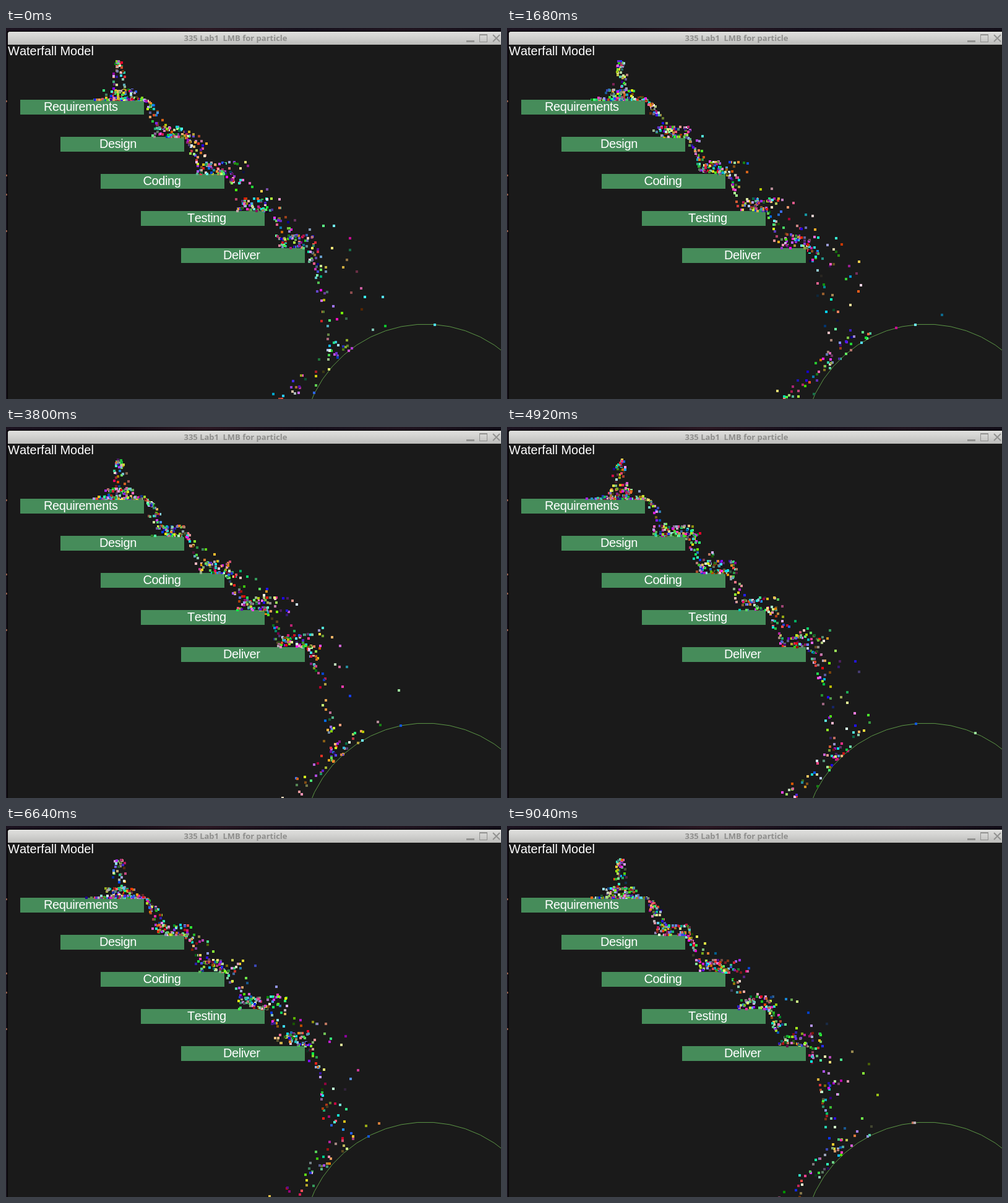
These frames come from a looping animation (800x600 px, 9.07 s). An HTML page with a canvas:

```html
<!DOCTYPE html>
<html lang="en">
<head>
<meta charset="utf-8">
<title>Waterfall Model</title>
<style>
  html, body { margin: 0; width: 100%; height: 100%; overflow: hidden; background: #1a1a1a; }
  canvas { display: block; }
</style>
</head>
<body>
<canvas id="stage" width="800" height="600"></canvas>
<script>
const ctx = document.getElementById('stage').getContext('2d');

const LOOP = 9070, FRAME = 40, STEPS_PER_FRAME = 2.5, WARM_UP = 1000;
const GRAVITY = 0.1, SLIDE = 0.014, DRAG = 0.995, BOUNCE = 0.52;
const EXTRA_RATE = 0.35;
const BOX_W = 200, BOX_H = 24;
const BALL = { x: 678, y: 679, r: 200, sides: 48, bounce: 0.3 };

const boxes = [
  ['Requirements', 61], ['Design', 151], ['Coding', 221.5],
  ['Testing', 293], ['Deliver', 351]
].map(([label, textX], i) => ({ label, textX, x: 23 + 65 * i, y: 116 + 60 * i }));

let seed, steps, particles;

function random() {
  seed = (seed + 0x6D2B79F5) | 0;
  let t = Math.imul(seed ^ (seed >>> 15), 1 | seed);
  t = (t + Math.imul(t ^ (t >>> 7), 61 | t)) ^ t;
  return ((t ^ (t >>> 14)) >>> 0) / 4294967296;
}
const spread = size => (random() * 2 - 1) * size;
const channel = () => Math.floor(random() * 256);

function emit() {
  particles.push({
    x: 183.5 + spread(5), y: 55 + spread(2),
    vx: spread(0.42), vy: spread(0.15),
    color: `rgb(${channel()},${channel()},${channel()})`
  });
}

function hitBox(p, box) {
  if (p.x < box.x || p.x > box.x + BOX_W || p.y < box.y || p.y > box.y + BOX_H) return;
  p.y = box.y;
  if (p.vy > 2) p.vx *= 1.03 + spread(0.28);   // hard landings scatter
  p.vx = p.vx * DRAG + SLIDE;
  p.vy = p.vy > 0.3 ? -p.vy * BOUNCE : 0;
}

function hitBall(p) {
  const dx = p.x - BALL.x, dy = p.y - BALL.y, dist = Math.hypot(dx, dy);
  if (dist > BALL.r) return;
  const nx = dx / dist, ny = dy / dist;
  p.x = BALL.x + nx * BALL.r;
  p.y = BALL.y + ny * BALL.r;
  const speed = p.vx * nx + p.vy * ny;
  if (speed < 0) {
    p.vx -= (1 + BALL.bounce) * speed * nx;
    p.vy -= (1 + BALL.bounce) * speed * ny;
  }
}

function step() {
  emit();
  if (random() < EXTRA_RATE) emit();
  for (const p of particles) {
    p.vy += GRAVITY;
    p.x += p.vx;
    p.y += p.vy;
    for (const box of boxes) hitBox(p, box);
    hitBall(p);
  }
  particles = particles.filter(p => p.y < 603);
  steps++;
}

function reset() {
  seed = 335;
  steps = -WARM_UP;
  particles = [];
}

function advanceTo(target) {
  if (target < steps) reset();
  while (steps < target) step();
}

function rect(color, x, y, w, h) {
  ctx.fillStyle = color;
  ctx.fillRect(x, y, w, h);
}

function gradient(x0, y0, x1, y1, ...colors) {
  const g = ctx.createLinearGradient(x0, y0, x1, y1);
  colors.forEach((c, i) => g.addColorStop(i / (colors.length - 1), c));
  return g;
}

function line(...points) {
  ctx.beginPath();
  points.forEach(([x, y]) => ctx.lineTo(x, y));
  ctx.stroke();
}

function drawWindow() {
  // dark desktop behind the window
  rect(gradient(0, 0, 800, 0, '#1c1320', '#120d16', '#2a1722', '#15101c', '#20141f', '#120e18'), 0, 0, 800, 6);
  rect('#17111b', 0, 6, 2, 594);
  for (const y of [117, 237, 268, 327]) rect('#8a5848', 0, y, 2, 3);
  rect('#000', 2, 5, 798, 22);
  ctx.fillStyle = gradient(0, 6, 0, 27, '#e0e0de', '#d0d0ce', '#bcbcba');
  ctx.beginPath();
  ctx.roundRect(3, 6, 800, 21, [3, 0, 0, 0]);
  ctx.fill();
  rect('#000', 2, 27, 1, 573);
  rect('#1a1a1a', 3, 27, 797, 573);

  ctx.fillStyle = '#8e8e8c';
  ctx.font = 'bold 13px "Open Sans", "Noto Sans", sans-serif';
  ctx.letterSpacing = '0px';
  ctx.fillText('335 Lab1', 287.5, 21);
  ctx.fillText('LMB for particle', 350.5, 21);

  rect('#929290', 744, 20, 13, 3);
  ctx.strokeStyle = '#929290';
  ctx.lineWidth = 1;
  ctx.strokeRect(765.5, 10.5, 12, 12);
  rect('#929290', 765, 10, 13, 2);
  ctx.lineWidth = 2;
  line([787, 11], [798, 22]);
  line([798, 11], [787, 22]);
}

function drawScene() {
  ctx.font = '20px "Liberation Sans", Arial, sans-serif';
  ctx.fontKerning = 'none';
  ctx.fillStyle = '#fff';
  ctx.fillText('Waterfall Model', 3, 44);

  ctx.letterSpacing = '-0.4px';
  for (const box of boxes) {
    rect('#468c5a', box.x, box.y, BOX_W, BOX_H);
    ctx.fillStyle = '#fff';
    ctx.fillText(box.label, box.textX, box.y + 18);
  }

  ctx.strokeStyle = '#5c9646';
  ctx.lineWidth = 1;
  line(...Array.from({ length: BALL.sides + 1 }, (_, i) => {
    const a = (i + 0.5) * 2 * Math.PI / BALL.sides;
    return [BALL.x + BALL.r * Math.cos(a), BALL.y + BALL.r * Math.sin(a)];
  }));

  for (const p of particles) rect(p.color, Math.round(p.x) - 2, Math.round(p.y) - 2, 4, 4);
}

const start = performance.now();

function draw() {
  const time = Math.max(0, performance.now() - start) % LOOP;
  advanceTo(Math.floor(Math.floor(time / FRAME) * STEPS_PER_FRAME));
  drawWindow();
  drawScene();
  requestAnimationFrame(draw);
}

reset();
draw();
</script>
</body>
</html>
```
